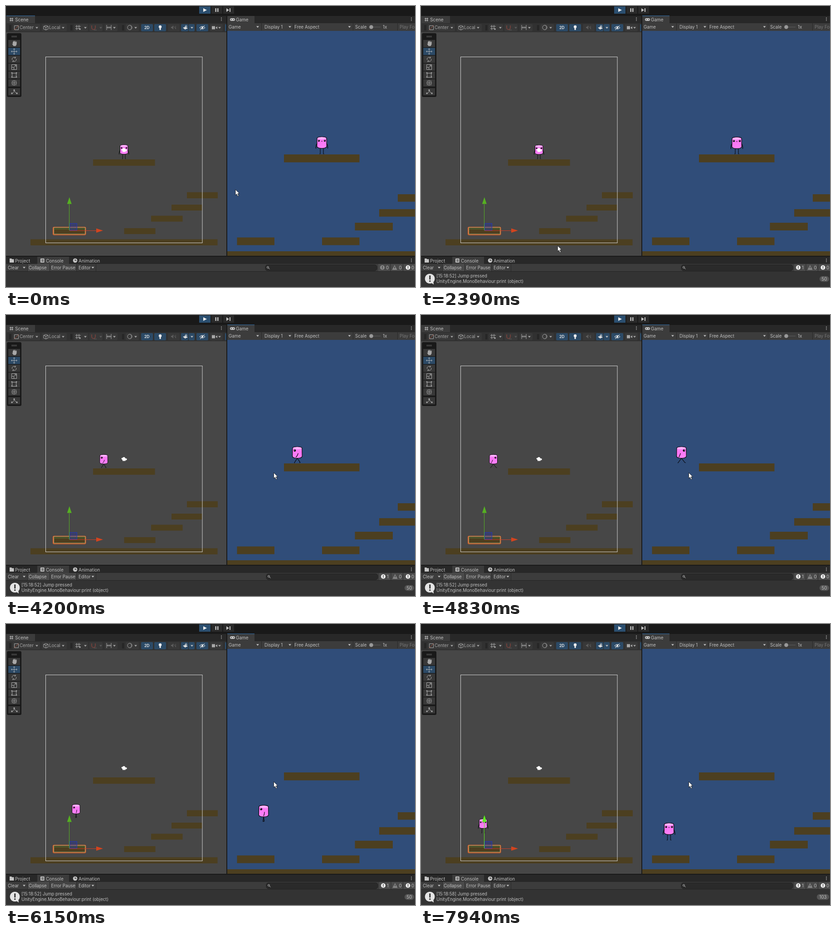
Animation, 902 px wide and 621 px high, one loop 8000 ms. Source, as an HTML page:

```html
<!DOCTYPE html>
<html lang="en">
<head>
<meta charset="utf-8">
<title>Platformer in the editor</title>
<style>
html, body { margin: 0; width: 100%; height: 100%; overflow: hidden; background: #191919; }
svg { display: block; font: 9.7px Inter, "Liberation Sans", sans-serif; }
text { fill: #c0c0c0; white-space: pre; }
.soft { opacity: .8; }
</style>
</head>
<body>
<svg id="stage" width="902" height="621" viewBox="0 0 902 621"></svg>
<script>
const LOOP = 8000, STEPS = 115, SCENE_SCALE = 0.8235;
const GREY = '#c4c4c4', DIM = '#666', BLUE = '#2c4a66', WOOD = '#4c3f20', INK = '#08080c';

const rect = (x, y, w, h, fill, more = '') =>
  `<rect x="${x}" y="${y}" width="${w}" height="${h}" fill="${fill}" ${more}/>`;
const text = (x, y, s, more = '') => `<text x="${x}" y="${y}" ${more}>${s}</text>`;
const line = (d, color = GREY, width = 1) =>
  `<path d="${d}" fill="none" stroke="${color}" stroke-width="${width}"/>`;
const fill = (d, color = GREY) => `<path d="${d}" fill="${color}"/>`;
const dot = (x, y, r, color = GREY) => `<circle cx="${x}" cy="${y}" r="${r}" fill="${color}"/>`;
const ring = (x, y, r, color = GREY) =>
  `<circle cx="${x}" cy="${y}" r="${r}" fill="none" stroke="${color}"/>`;
const drop = (x, y) => fill(`M${x - 3} ${y - 1.5}h6l-3 3.5z`);
const kebab = (x, y) => [-3, 0, 3].map(k => rect(x - .7, y + k - .7, 1.5, 1.5, GREY)).join('');
const button = (x, w, on) => rect(x, 40, w, 16, on ? BLUE : '#383838', 'rx="2"');

function topBar() {
  return rect(0, 0, 902, 21, '#191919') +
    rect(426, 1, 25, 16, '#2b4f70') + rect(453, 1, 24, 16, '#2a2a2a') + rect(479, 1, 24, 16, '#2a2a2a') +
    fill('M435 5l8 4-8 4z', '#eee') +
    rect(461.5, 5, 2.5, 8, GREY) + rect(466, 5, 2.5, 8, GREY) +
    fill('M486 5l6 4-6 4z') + rect(493, 5, 2, 8, GREY);
}

function sceneBar() {
  const big = 'font-size="10"';
  return rect(0, 22, 486, 16, '#282828') + rect(1, 22, 63, 16, '#3c3c3c') +
    line('M10 26v8M14 26v8M8 28h8M8 32h8') + text(20, 34, 'Scene', big) + kebab(475, 29) +
    rect(0, 38, 486, 20, '#313131') +
    [8, 143, 257].map(x => line(`M${x} 42v12M${x + 2.5} 42v12`, '#191919')).join('') +
    button(15, 60) + button(79, 55) + button(150, 31) + button(184, 29) + button(218, 28) +
    button(264, 29) + button(298, 26, 1) + button(327, 26, 1) + button(357, 26) +
    button(386, 16, 1) + button(403, 13, 1) + button(420, 26, 1) + button(450, 28) + button(483, 3, 1) +
    '<g class="soft">' +
    line('M18.500 43.500h9v9h-9z') + line('M18 53l10-10', '#b5533c') + text(30, 51, 'Center') + drop(68, 48) +
    line('M83 45l5-2 5 2v6l-5 2-5-2zM83 45l5 2 5-2M88 47v6') + text(95, 51, 'Local') + drop(126, 48) +
    line('M156 42v11M161 42v8M153 45h12M153 50h9') + dot(163, 51, 1.8) + drop(175, 48) +
    line('M189 43v5a4 4 0 0 0 8 0v-5', '#7c423c', 2) + line('M194 53h6', DIM) +
    fill('M206 46.500h6l-3 3.500z', DIM) +
    line('M222 42v11M232 42v11M222 47.500h10M225 45v5M229 45v5') + drop(239, 48) +
    ring(273, 47.5, 5) + fill('M274 43a5 5 0 0 1 0 9a6 6 0 0 0 0-9z') + drop(286, 48) +
    fill('M364 46h2l3-3v9l-3-3h-2z', DIM) + line('M370 45l5 6M374 44v7', DIM) +
    rect(454, 44.5, 7, 7, GREY) + fill('M462 48l4-3v6z') + drop(471, 48) + '</g>' +
    text(305, 51, '2D', 'font-weight="600" style="fill:#eee" font-size="8.6"') +
    dot(340, 46, 3.2, '#eee') + rect(338.5, 49, 3, 4, '#eee') +
    fill('M390 48l6-2 5 3-6 3z', '#ddd') + line('M397 42v6M394 45h6', '#ddd') + drop(410, 48) +
    line('M427 48q6-6 12 0q-6 6-12 0zM428 53l10-10', '#eee') + dot(433, 48, 2, '#eee');
}

function palette() {
  const ys = [83, 100.4, 117.8, 135.2, 152.6, 170, 189.5];
  return rect(2, 60, 32, 141, '#191919', 'rx="3"') + line('M12 66.500h12M12 68.500h12', '#555') +
    ys.map((y, i) => rect(5, y - 8, 26, 16, i == 1 ? BLUE : '#383838')).join('') + '<g class="soft">' +
    fill('M13 83l2 1v-5h1.500v-2h1.500v2h1v-2h1.500v2.500h1.500v-1h1.500v6l-2 4h-5z') +
    line('M12 100.500h12M18 94.500v12M13.500 98.500l-2 2 2 2M22.500 98.500l2 2-2 2M16 96l2-2 2 2M16 105l2 2 2-2') +
    line('M13.500 119a4.500 4.500 0 0 1 7.500-4.500M22.500 117a4.500 4.500 0 0 1-7.500 4.500M21 112v3h-3M15 124v-3h3') +
    line('M12.500 129.500h11v11h-11zM12.500 135.500h5v5M18 135l4-4M19 131h3v3') +
    line('M13.500 148.500h9v9h-9z') +
    [[13, 148], [23, 148], [13, 157], [23, 157]].map(p => dot(...p, 1.4)).join('') +
    ring(18, 170, 5) + line('M14 170h8M18 166v8M13 165l2 2M23 165l-2 2M13 175l2-2M23 175l-2-2') +
    line('M13 193q5-1 5-7q2 6 6 7') + dot(13, 193, 1.7) + dot(18, 186, 1.7) + dot(24, 193, 1.7) + '</g>';
}

function gameBar() {
  return rect(488, 22, 414, 16, '#282828') + rect(488, 22, 60, 16, '#3c3c3c') +
    rect(494, 27, 11, 6, GREY, 'rx="3"') + dot(497, 30, 1, '#333') + dot(502, 30, 1, '#333') +
    text(507, 34, 'Game', 'font-size="10"') + kebab(894, 29) +
    rect(488, 38, 414, 17, '#3c3c3c') +
    [563.5, 633.5, 765.5, 863.5].map(x => line(`M${x} 38v16`, '#292929')).join('') +
    text(491, 49.5, 'Game') + drop(555, 46) + text(570, 49.5, 'Display 1') + drop(626, 46) +
    text(636, 49.5, 'Free Aspect') + drop(757.5, 46) + text(770, 49.5, 'Scale') +
    line('M801 46.500h25', '#5e5e5e') + dot(805.5, 46.5, 4.3, '#999') + text(831, 49.5, '1x') +
    text(868, 49.5, 'Play Focused', 'style="fill:#777"');
}

function consoleBar() {
  const tab = 'font-size="10"';
  return rect(0, 552, 902, 69, '#191919') + rect(0, 554, 902, 16, '#282828') +
    rect(69, 554, 70, 16, '#3c3c3c') +
    fill('M8 558h4l1.500 1.500h4v7.500h-9.500z') + text(20, 566.5, 'Project', tab) +
    rect(76, 558, 8.5, 9, GREY, 'rx="1"') + line('M78 560.500h5M78 562.500h5M78 564.500h5', '#333') +
    text(88, 566.5, 'Console', tab) +
    dot(152.5, 562.5, 4.8) + line('M152.500 559.500v3h3', '#282828', 1.2) + text(160, 566.5, 'Animation', tab) +
    kebab(894, 562) +
    rect(0, 570, 902, 17, '#3c3c3c') + rect(48, 570, 48, 16, '#4a4a4a') + rect(97, 570, 58, 16, '#444') +
    [47.5, 96.5, 155.5, 198.5].map(x => line(`M${x} 570v16`, '#292929')).join('') +
    text(4, 582, 'Clear') + drop(40, 578) + text(50, 582, 'Collapse') + text(99.5, 582, 'Error Pause') +
    text(160, 582, 'Editor') + drop(191.5, 578) +
    rect(0, 586, 902, 1, '#252525') + rect(0, 587, 902, 34, '#333');
}

const ledge = ([x, y, w, h]) => rect(x, y, w, h, WOOD);
const sceneLedges = [[192, 339, 136.5, 14], [399, 411.5, 68, 13.5], [365, 439, 67.5, 13],
  [320, 463.5, 69.5, 13], [260.5, 491, 69, 13], [105, 490, 70, 15], [54, 515.5, 412.5, 13.5]];
const gameLedges = [[613, 328, 166.5, 17.5], [864, 416, 38, 16.5], [823, 449, 79, 16.5],
  [769.5, 479, 83.5, 17], [697, 511.5, 82.5, 17], [509.5, 511.5, 82.5, 17], [488, 542, 414, 10.5]];

const gizmo =
  rect(104, 489, 71.5, 16.5, 'none', 'rx="2" stroke="#d8602a" stroke-width="2"') +
  line('M105.500 504V489.500h69v14.500z', '#a8a878') + line('M105 492.500h70', '#55803f') +
  rect(140.5, 480.5, 16, 15, '#2030b0', 'fill-opacity=".35" stroke="#2438b0"') +
  line('M140 496.500h60', '#c8402a') + fill('M199 491.500l15 4.700-15 4.700z', '#d2441f') +
  '<g id="up"><path d="M139.500 438v58" stroke="currentColor"/>' +
  '<path d="M134.800 437.500l5-15 5 15z" fill="currentColor"/></g>';

const cameraIcon = fill('M254.500 318a2.600 2.600 0 0 1 3-2.500a3 3 0 0 1 5.500 1l3.500 1v3l-3 .5v1.500h-6.500v-2z', '#fff');

stage.innerHTML =
  `<defs><linearGradient id="pink" x2=".3" y2="1"><stop stop-color="#fb9cf8"/>
   <stop offset=".45" stop-color="#fa74f4"/><stop offset="1" stop-color="#fb80f8"/>
   </linearGradient><g id="hero"></g></defs>` +
  rect(0, 0, 902, 621, '#191919') + topBar() +
  rect(0, 58, 486, 494, '#474747') + sceneLedges.map(ledge).join('') +
  '<use id="sceneHero" href="#hero"/>' + rect(87.5, 112.5, 345.5, 411, 'none', 'stroke="#d2d2d2"') +
  cameraIcon + gizmo + sceneBar() + palette() +
  rect(488, 54, 414, 498, '#304d79') + gameLedges.map(ledge).join('') +
  '<use id="gameHero" href="#hero"/>' + gameBar() + '<g id="focus"></g>' +
  consoleBar() + '<g id="log"></g>' +
  '<path id="mouse" d="M0 0v12.500l2.800-2.600 2.200 5 2.200-1-2.200-4.800h3.800z" fill="#fff" stroke="#111" stroke-width=".8"/>';

const el = id => document.getElementById(id);

// Piecewise linear value of [time, value, time, value, ...]
function at(keys, t) {
  let i = 0;
  while (i + 2 < keys.length && keys[i + 2] <= t) i += 2;
  if (t <= keys[0] || i + 2 >= keys.length) return keys[i + 1];
  return keys[i + 1] + (keys[i + 3] - keys[i + 1]) * (t - keys[i]) / (keys[i + 2] - keys[i]);
}

const heroX = [3340, 696.5, 3420, 694.3, 3740, 694.3, 4060, 659, 4700, 580, 4830, 574, 4900, 570,
  5300, 554, 5900, 573, 6150, 568, 6560, 551, 6700, 547];
const heroFall = [4830, 0, 4900, 2.5, 5100, 13, 5400, 36, 5730, 64.5, 6150, 110.5, 6560, 161, 6700, 184];
const mouseX = [880, 506, 1020, 533, 1500, 117, 1600, 117, 1900, 60, 2150, 60, 2600, 520, 2950, 585, 3520, 585, 3700, 590.5];
const mouseY = [880, 405.5, 1020, 392, 1500, 619, 1600, 619, 1900, 622, 2150, 610, 2600, 457, 2950, 347.5, 3520, 347.5, 3700, 348.5];

const jump = (t, apex, height) => Math.max(0, height - 1.16e-4 * (t - apex) ** 2);

// Feet stand at the local origin.
const body = top => `<path d="M-10.500 ${top + 3}q1.500-3 10.500-3t10.500 3l.3 18.500q-1.500 4-10.800 4t-10.800-4z"
  fill="url(#pink)" stroke="${INK}" stroke-width="1.2"/>` +
  `<ellipse cy="${top + 3.3}" rx="9.3" ry="2.5" fill="#fcb2fa"/>`;

function idleHero(t) {
  const sink = Math.floor((t + 440) / 510) % 2 * .6;
  return line('M-3.500-14v13l-1.500.5M3.500-14v13l1.500.5', INK, 1.1) +
    `<g transform="translate(0 ${sink})">` + body(-38.5) +
    line('M-10.500-24q-3 4-2.500 11.500M10.500-24q3 4 2.500 11.500', INK, 1.2) +
    dot(-6.5, -29.7, 2.1, '#000') + dot(6.5, -29.7, 2.1, '#000') +
    dot(-7, -30.3, .6, '#fff') + dot(6, -30.3, .6, '#fff') +
    line('M-1.500-29q1.500 1.500 3 0', '#301030') + '</g>';
}

function walkHero(t) {
  const right = t > 4740 && t < 4880 || t > 5300 && t < 5900;
  const s = Math.cos((t - 4830) / 400 * 2 * Math.PI);
  return `<g transform="scale(${right ? 1 : -1} 1)">` +
    line(`M0-11L${-7.5 * s} -1l-1 .5M0-11L${7.5 * s} -1.500l2 .5`, INK, 1.2) + body(-36.5) +
    line(`M-2-22Q${-2 - 2 * s}-16 ${-1 - 5 * s}-13`, INK, 1.2) +
    dot(5.5, -28, 2.4, '#000') + dot(6.2, -28.8, .8, '#fff') + '</g>';
}

function logView(t) {
  const on = t > 1040, again = t > 7310, off = on ? 2 : 0;
  const count = Math.round(at([1040, 1, 1500, 50, 7310, 50, 7880, 103], t));
  const w = 9 + 6 * String(count).length;
  const icon = (x, color) => dot(x, 578, 5, color) + rect(x - .7, 575, 1.5, 3.5, '#333') + rect(x - .7, 579.5, 1.5, 1.5, '#333');
  const counters = rect(572 + off, 572, 246, 13, '#2a2a2a', 'rx="5" stroke="#202020"') +
    ring(577.5 + off, 577.5, 1.9) + line(`M${579 + off} 579l2.500 2.500`) +
    rect(821 + off, 570, 81, 16, '#4a4a4a') +
    line(`M${848 + off / 2} 570v16M875.500 570v16`, '#292929') +
    icon(830 + off, on ? '#eee' : '#888') + text(838 + off, 582, on ? 1 : 0) +
    fill(`M${857 + off / 2} 572.500l5.500 10.500h-11z`, '#888') + rect(856.5 + off / 2, 576, 1.3, 4, '#333') +
    text(866.5, 582, 0) + icon(886.5, '#eee') + text(894, 582, 0);
  if (!on) return counters;
  return counters + dot(19.5, 602.5, 10.8, '#e4e4e4') + fill('M20 610l8 5.500-1-9z', '#e4e4e4') +
    rect(18.2, 595.5, 3, 9, '#333') + rect(18.2, 606.5, 3, 3, '#333') +
    text(34, 599.5, `[15:18:${again ? 58 : 52}] Jump pressed`) +
    text(34, 611.5, 'UnityEngine.MonoBehaviour:print (object)') +
    rect(900 - w, 597, w, 12.5, '#555', 'rx="6"') +
    text(900 - w / 2, 606.8, count, 'text-anchor="middle"');
}

function draw(now) {
  const t = (Math.floor(now % LOOP * STEPS / LOOP) + .3) * LOOP / STEPS;
  const x = at(heroX, t);
  const fall = at(heroFall, t) - jump(t, 1600, 35) - jump(t, 7900, 33.5);
  el('hero').innerHTML = t > 3740 && t < 6700 ? walkHero(t) : idleHero(t);
  el('gameHero').setAttribute('transform', `translate(${x} ${327.5 + fall})`);
  el('sceneHero').setAttribute('transform',
    `translate(${260.2 + (x - 696.5) * SCENE_SCALE} ${338.3 + fall * SCENE_SCALE}) scale(${SCENE_SCALE})`);
  el('up').style.color = t > 6650 ? '#5cf01c' : '#56b022';
  el('focus').innerHTML = t < 640 ? rect(1, 21, 63, 1.3, '#2f5f8c') : rect(488, 21, 60, 1.3, '#2f5f8c');
  el('log').innerHTML = logView(t);
  el('mouse').setAttribute('transform', `translate(${at(mouseX, t)} ${at(mouseY, t)})`);
  requestAnimationFrame(() => draw(performance.now() - start));
}
const start = performance.now();
draw(0);
</script>
</body>
</html>
```
